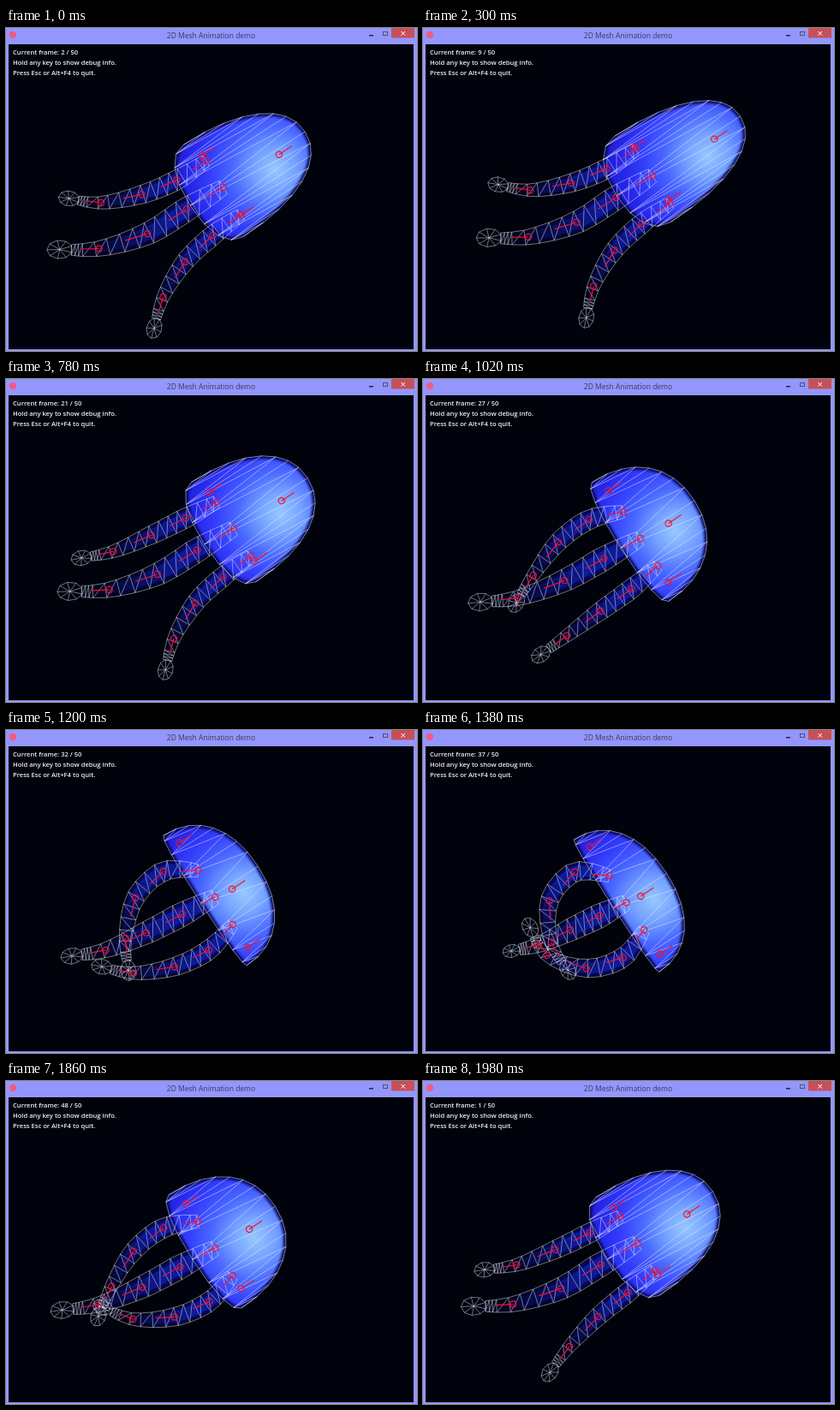
Recreate the animation shown at these times as an HTML page with a canvas. Size 480 by 377 pixels, loop 2.04 s.

```html
<!DOCTYPE html>
<html>
<head>
<meta charset="utf-8">
<style>
html, body { margin: 0; width: 480px; height: 377px; overflow: hidden; background: #9397fd; }
canvas { display: block; }
</style>
</head>
<body>
<canvas id="stage" width="480" height="377"></canvas>
<script>
const g = document.getElementById('stage').getContext('2d');
const STEP = 60, STEPS = 34, TAU = Math.PI * 2;

// Angles are degrees below "left", from root to tip.
const arms = [
  { root: -34, size: .97, rise: 9, loose: [34, 22, 10, -10], curled: [-8, 50, 96, 127] },
  { root: 3, size: 1.18, rise: 10, loose: [31, 32, 17, 1], curled: [26, 25, 26, 14] },
  { root: 41, size: .97, rise: 12, loose: [36, 44, 60, 77], curled: [58, 8, -42, -100] }
];
const bones = [42, 46, 50, 39];
const girth = [7.5, 12, 11, 7.5, 4];
const cuts = [...Array(13).keys()].map(i => i * .28).concat(3.45, 3.53, 3.62);

const mix = (a, b, u) => a + (b - a) * u;
const toward = (a, b, u) => [mix(a[0], b[0], u), mix(a[1], b[1], u)];
const dist = (a, b) => Math.hypot(a[0] - b[0], a[1] - b[1]);
const range = n => [...Array(n).keys()];

function ease(n, from, to) {
  const u = Math.max(0, Math.min(1, (n - from) / (to - from)));
  return u * u * (3 - 2 * u);
}

// Bell space: u runs forward along the body axis, v across it.
function poseAt(n) {
  const m = n < 6 ? n + STEPS : n;
  const squeeze = 1 - ease(m, 8, 22) + ease(m, 27, 36);
  const sway = Math.cos((n - 8.5) / STEPS * TAU);
  const place = (u, v) => [242 + 18 * sway + .84 * u + .54 * v, 190 - 17 * sway - .54 * u + .84 * v];
  const length = mix(70, 136, squeeze), width = mix(92, 60, squeeze), back = mix(4, 36, squeeze);

  const arc = (depth, count) => range(count).map(i => {
    const a = (i / (count - 1) - .5) * Math.PI, s = Math.sin(a);
    return place(depth * Math.abs(Math.cos(a)) ** .9, width * Math.sign(s) * Math.abs(s) ** .9);
  });

  const side = mix(75, 37, squeeze);
  return {
    dome: arc(length, 17),
    rim: arc(-back, 9),
    glow: place(length * .58, 18),
    joints: [place(length - 40, 6), place(11, -side), place(12, side)],
    arms: arms.map(arm => {
      const curl = ease(m, arm.rise, arm.rise + 16) - ease(m, 28, 34.5);
      const shrink = arm.size > 1 ? 1 - .4 * curl ** 3 : 1;
      const pts = [place(12, arm.root)];
      bones.forEach((b, i) => {
        const a = mix(arm.loose[i], arm.curled[i], curl) * Math.PI / 180;
        const r = b * arm.size * shrink, [x, y] = pts[i];
        pts.push([x - r * Math.cos(a), y + r * Math.sin(a)]);
      });
      return pts;
    })
  };
}

// Smooth curve through points; t counts points.
function curve(p, t) {
  const i = Math.min(Math.floor(t), p.length - 2), u = t - i;
  const a = p[i], b = p[i + 1], o = p[i - 1] || a, c = p[i + 2] || b;
  return [0, 1].map(k => mix(a[k], b[k], u * u * (3 - 2 * u))
    + (b[k] - o[k]) / 2 * u * (1 - u) ** 2 - (c[k] - a[k]) / 2 * u * u * (1 - u));
}

function trace(pts, closed) {
  g.beginPath();
  pts.forEach(p => g.lineTo(...p));
  if (closed) g.closePath();
}
function line(...pts) { trace(pts); g.stroke(); }

function ribs(arm, size) {
  return cuts.map(t => {
    const c = curve(arm, t), a = curve(arm, Math.max(0, t - .05)), b = curve(arm, t + .05);
    const i = Math.floor(t), r = mix(girth[i], girth[i + 1], t - i) * size, d = dist(a, b);
    const x = -(b[1] - a[1]) / d * r, y = (b[0] - a[0]) / d * r;
    return { t, c, r, l: [c[0] + x, c[1] + y], m: [c[0] - x, c[1] - y] };
  });
}

function paintArm(rows) {
  g.lineCap = 'round';
  for (const [size, red, green, blue] of [[1.75, 6, 6, 96], [1.2, 14, 26, 150]])
    rows.slice(1).forEach((s, i) => {
      const k = Math.max(0, Math.min(1, (3.7 - s.t) / 2));
      g.strokeStyle = `rgb(${red * k},${green * k},${mix(14, blue, k)})`;
      g.lineWidth = s.r * size;
      line(rows[i].c, s.c);
    });
  g.lineCap = 'butt';
}

function meshArm(arm, rows) {
  rows.forEach((s, i) => {
    line(s.l, s.m);
    const n = rows[i + 1];
    if (n) line(s.m, n.m, s.l, n.l);
  });
  const wrist = arm[3], tip = arm[4], r = dist(wrist, tip) * .26;
  const turn = Math.atan2(tip[1] - wrist[1], tip[0] - wrist[0]);
  const ring = range(9).map(i => {
    const x = Math.cos(i / 9 * TAU) * r * 1.25, y = Math.sin(i / 9 * TAU) * r * .9;
    return [tip[0] + x * Math.cos(turn) - y * Math.sin(turn), tip[1] + x * Math.sin(turn) + y * Math.cos(turn)];
  });
  trace(ring, true);
  g.stroke();
  ring.forEach(p => line(tip, p));
}

function paintBell(outline, [x, y]) {
  const light = g.createRadialGradient(x, y, 0, x, y, 125);
  ['#98c8ff', '#74a2ff', '#4a68ff', '#343ffc', '#2626ea', '#1a1ac8']
    .forEach((c, i) => light.addColorStop(i / 5, c));
  g.save();
  trace(outline, true);
  g.clip();
  g.fillStyle = light;
  g.fill();
  g.filter = 'blur(1.5px)';
  g.strokeStyle = '#07075c';
  g.lineWidth = 6;
  g.stroke();
  g.restore();
}

function meshBell(dome, rim, outline) {
  trace(outline, true);
  g.stroke();
  dome.forEach((p, i) => {
    line(p, rim[i >> 1]);
    if (i % 2) line(p, rim[(i + 1) / 2]);
  });
}

function bone(p, q) {
  line(p, q);
  g.beginPath();
  g.arc(...p, 3.6, 0, 7);
  g.stroke();
}

function text(s, x, y, font, color) {
  g.font = font + ' "Open Sans", sans-serif';
  g.fillStyle = color;
  g.fillText(s, x, y);
}

function box(color, ...r) { g.fillStyle = color; g.fillRect(...r); }

function paintWindow(count) {
  box('#9397fd', 0, 0, 480, 377);
  box('#00020c', 3, 19, 473, 356);
  g.textBaseline = 'middle';
  g.textAlign = 'center';
  text('2D Mesh Animation demo', 239.5, 9.5, '8.5px', '#3a3a58');
  g.textAlign = 'left';
  [`Current frame: ${count} / 50`, 'Hold any key to show debug info.', 'Press Esc or Alt+F4 to quit.']
    .forEach((s, i) => text(s, 8, 29 + i * 11.8, '600 7.6px', '#f2f2f2'));
  g.fillStyle = '#ef5c86';
  g.beginPath();
  g.arc(8, 8, 4.2, 0, 7);
  g.fill();
  box('#26263e', 424, 8, 5, 1.5);
  g.lineWidth = 1;
  g.strokeStyle = '#50506e';
  g.strokeRect(440.5, 4.5, 5, 4);
  box('#c75058', 450, 0, 27, 11.5);
  g.strokeStyle = '#fff';
  line([461.5, 4], [466, 8.5]);
  line([466, 4], [461.5, 8.5]);
}

function draw(n) {
  const pose = poseAt(n);
  const outline = [...pose.dome, ...pose.rim.slice(1, -1).reverse()];
  const rows = pose.arms.map((a, i) => ribs(a, arms[i].size));
  const count = Math.floor(2.45 + 1.495 * n - .22 * Math.sin(n / STEPS * TAU)); // slightly uneven pace

  paintWindow((count - 1) % 50 + 1);
  rows.forEach(paintArm);
  paintBell(outline, pose.glow);

  g.lineWidth = .8;
  g.strokeStyle = 'rgba(235,240,255,.6)';
  pose.arms.forEach((a, i) => meshArm(a, rows[i]));
  meshBell(pose.dome, pose.rim, outline);

  g.lineWidth = 1.2;
  g.strokeStyle = '#f5122f';
  pose.arms.forEach(a => a.slice(0, 4).forEach((p, k) => bone(p, toward(p, a[k + 1], .46))));
  pose.joints.forEach(p => bone(p, [p[0] + 15, p[1] - 10]));
}

const start = performance.now();
function tick() {
  draw(Math.floor((performance.now() - start) / STEP) % STEPS);
  requestAnimationFrame(tick);
}
tick();
</script>
</body>
</html>
```
